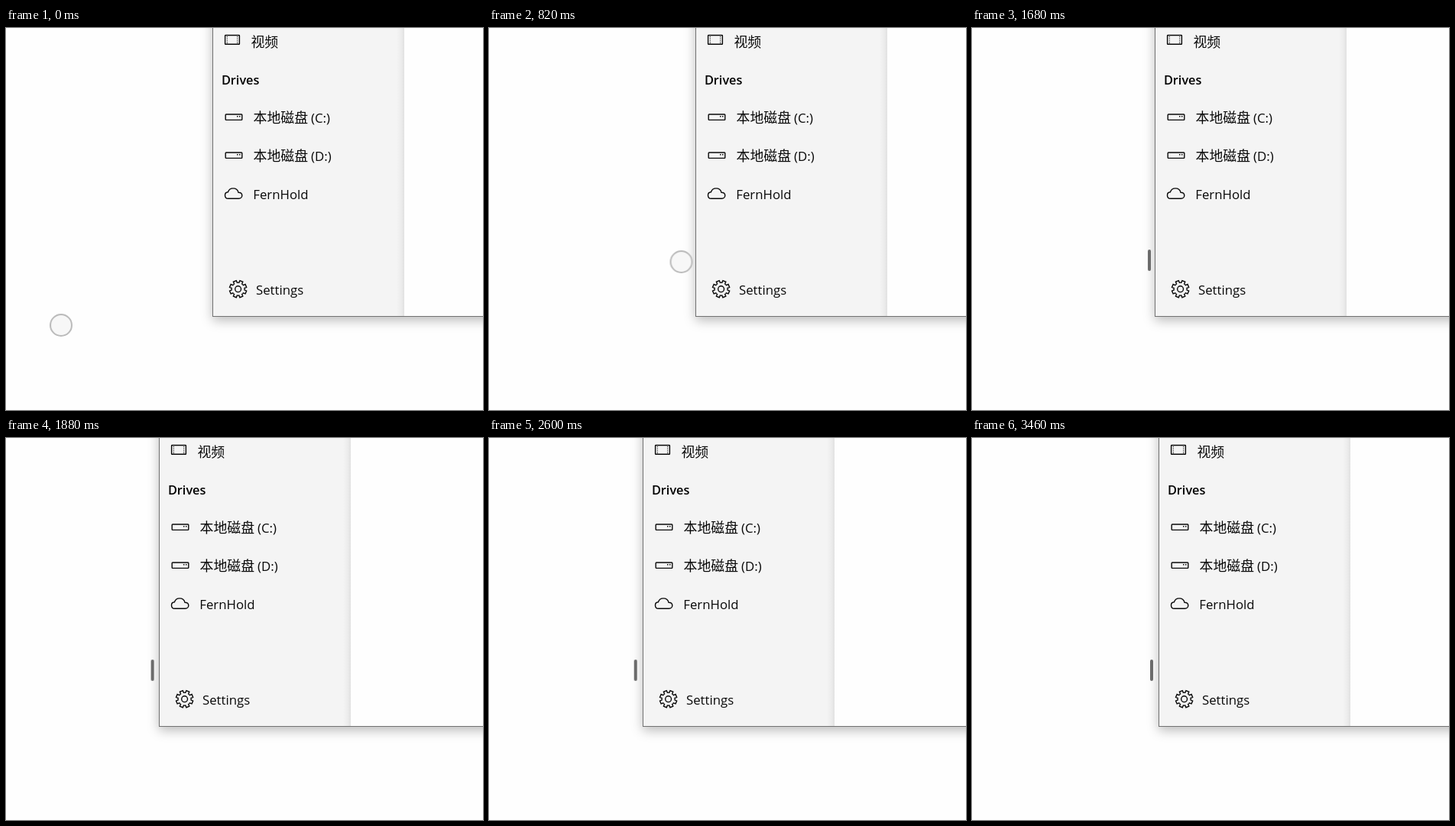
Recreate the animation shown at these times as an HTML page. Size 624 by 500 pixels, loop 3600 ms.

```html
<!DOCTYPE html>
<html lang="zh-CN">
<head>
<meta charset="utf-8">
<title>Window edge drag</title>
<style>
  html, body { margin: 0; width: 100%; height: 100%; overflow: hidden; background: #fefefe; }
  .stage { position: relative; width: 624px; height: 500px; overflow: hidden; }

  .window {
    position: absolute; left: 270px; top: -61px; width: 700px; height: 437px;
    border: 1px solid #717171; background: #fefefe;
    box-shadow: 0 5px 14px rgba(0, 0, 0, .26);
    animation: drag 3600ms infinite;
  }
  .sidebar {
    position: absolute; inset: 0 auto 0 0; width: 250px;
    background: linear-gradient(to left, #e1e1e1, #ececec 4px, #f4f4f4 10px);
  }
  svg { position: absolute; left: 0; top: 60px; width: 250px; height: 377px; }
  text { font: 16.8px "Open Sans", "Noto Sans", sans-serif; fill: #080808; }
  .head { font-size: 16.3px; font-weight: 600; fill: #000; }
  .zh { font: 17.9px "Noto Sans CJK SC", "Noto Sans CJK", sans-serif; }
  .icon { fill: none; stroke: #080808; stroke-width: 1.4; }

  .track-x, .track-y { position: absolute; left: 0; top: 0; }
  .track-x { animation: move-x 3600ms infinite; }
  .track-y { animation: move-y 3600ms infinite; }
  .pointer {
    position: absolute; box-sizing: border-box; transform: translate(-50%, -50%);
    width: 30px; height: 30px; border: 2px solid #bababa; border-radius: 15px;
    background: #f7f7f7;
    animation: morph 3600ms infinite;
  }

  @keyframes drag {
    0% { left: 270px; }
    42.53% { left: 270px; animation-timing-function: ease; }
    60.31% { left: 187px; }
    68.8% { left: 187px; animation-timing-function: cubic-bezier(.33, .1, .5, 1); }
    82.36%, 100% { left: 244px; }
  }
  @keyframes move-x {
    0% { transform: translateX(72px); animation-timing-function: cubic-bezier(.37, 0, .63, 1); }
    26.67% { transform: translateX(261px); }
    42.72% { transform: translateX(261px); animation-timing-function: ease; }
    60.5% { transform: translateX(178px); }
    68.8% { transform: translateX(178px); animation-timing-function: cubic-bezier(.33, .1, .5, 1); }
    82.36%, 100% { transform: translateX(235px); }
  }
  @keyframes move-y {
    0% { transform: translateY(389px); animation-timing-function: cubic-bezier(.3, .2, .5, 1); }
    26.67%, 100% { transform: translateY(304px); }
  }
  @keyframes morph {
    0%, 24.44% {
      width: 30px; height: 30px; border-color: #bababa; background: #f7f7f7;
      animation-timing-function: ease;
    }
    31.5%, 100% { width: 4px; height: 28px; border-color: #6b6b6b; background: #6b6b6b; }
  }
</style>
</head>
<body>
<div class="stage">
  <div class="window">
    <div class="sidebar"></div>
    <svg viewBox="0 0 250 377">
      <defs>
        <g id="disk">
          <rect class="icon" x="16.2" y="-4" width="21.6" height="7.4" rx=".8"/>
          <path d="M31 -2h1.5v1.5h-1.5zM34 -2h1.5v1.5h-1.5z" fill="#080808"/>
          <text class="zh" x="52.5" y="7.3">本地磁盘</text>
        </g>
        <path id="tooth" d="M-3.25 -7.85L-2.1 -8.2V-11.1H2.1V-8.2L3.25 -7.85"/>
        <g id="teeth">
          <use href="#tooth" transform="rotate(22.5)"/>
          <use href="#tooth" transform="rotate(67.5)"/>
          <use href="#tooth" transform="rotate(112.5)"/>
          <use href="#tooth" transform="rotate(157.5)"/>
        </g>
      </defs>

      <g class="icon">
        <rect x="15.6" y="9.5" width="18.8" height="11.8" rx=".5"/>
        <path d="M18.3 11v9.5M31.7 11v9.5" stroke-dasharray="1.2 1.4" stroke-width="1"/>
      </g>
      <text class="zh" x="49.4" y="25">视频</text>

      <text class="head" x="10.9" y="74">Drives</text>

      <use href="#disk" y="117"/>
      <text x="128" y="124">(C:)</text>
      <use href="#disk" y="167"/>
      <text x="128" y="174">(D:)</text>

      <path class="icon" d="M19.8 223.2C16.8 223.2 15.5 221.2 15.5 218.9S17 214.8 19.4 214.7C20.4 211.8 23 209.9 26.1 209.9C29.6 209.9 32.3 212.1 33 215.2C36 215.2 37.8 217 37.8 219.2S36 223.2 33.5 223.2Z"/>
      <text x="52.3" y="224">FernHold</text>

      <g class="icon" transform="translate(32.6 341.7)" stroke-width="1.3">
        <use href="#teeth"/>
        <use href="#teeth" transform="rotate(180)"/>
        <circle r="3.9"/>
      </g>
      <text x="56" y="349">Settings</text>
    </svg>
  </div>
  <div class="track-x"><div class="track-y"><div class="pointer"></div></div></div>
</div>
</body>
</html>
```
